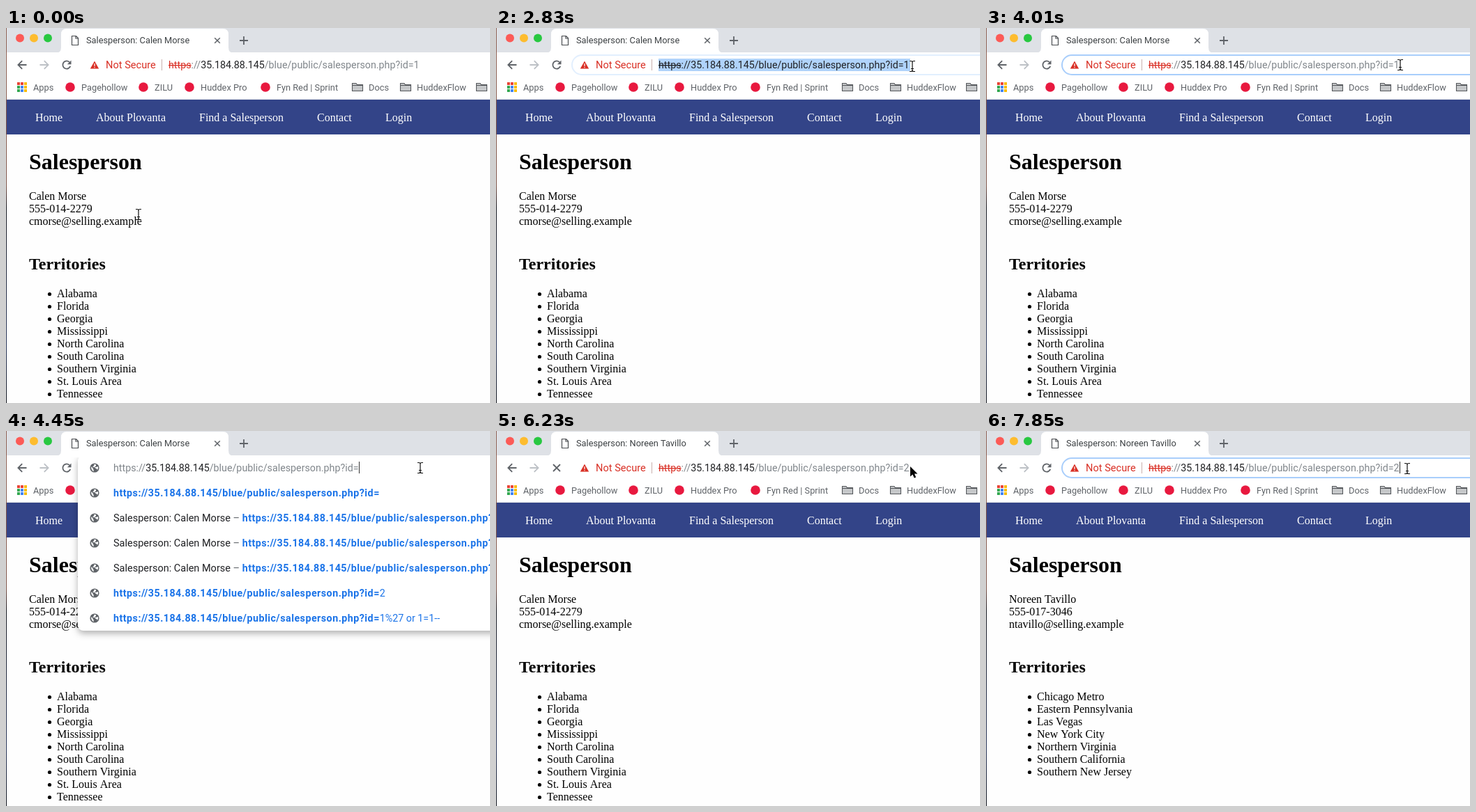
Recreate the animation shown at these times as an HTML page with a canvas. Size 694x539 px, loop 8 s.

```html
<!DOCTYPE html>
<html lang="en">
<head>
<meta charset="utf-8">
<title>Salesperson lookup</title>
<style>
html, body { margin: 0; width: 100%; height: 100%; overflow: hidden; background: #fefefe; }
canvas { display: block; }
</style>
</head>
<body>
<canvas id="stage" width="694" height="539"></canvas>
<script>
const ctx = document.getElementById('stage').getContext('2d');
const W = 694, H = 539, LOOP = 8000, TICK = LOOP / 54;

const SERIF = '"Liberation Serif", serif';
const SANS = 'Roboto, sans-serif';
const URL_FONT = `14.27px ${SANS}`;
const LABEL_FONT = `14.5px ${SANS}`;
const BOLD_FONT = `bold 14.27px ${SANS}`;
const SMALL_FONT = `12.8px ${SANS}`;
const INK = '#202124', GREY = '#5f6368', PALE = '#80868b', RED = '#d93025', BLUE = '#1a73e8';

const SCHEME = 'https', HOST = '35.184.88.145', PATH = '/blue/public/salesperson.php?id=';
const BASE = `${SCHEME}://${HOST}${PATH}`;

const PEOPLE = [
  {
    name: 'Calen Morse', phone: '555-014-2279', mail: 'cmorse@selling.example',
    areas: ['Alabama', 'Florida', 'Georgia', 'Mississippi', 'North Carolina',
      'South Carolina', 'Southern Virginia', 'St. Louis Area', 'Tennessee']
  },
  {
    name: 'Noreen Tavillo', phone: '555-017-3046', mail: 'ntavillo@selling.example',
    areas: ['Chicago Metro', 'Eastern Pennsylvania', 'Las Vegas', 'New York City',
      'Northern Virginia', 'Southern California', 'Southern New Jersey']
  }
];

// Pointer stops: tick, x, y, shape
const POINTER = [
  [0, 190, 268, beam], [1, 234, 245, arrow], [3, 290, 228, arrow], [4, 355, 203, arrow],
  [5, 402, 187, arrow], [7, 427, 167, arrow], [8, 470, 130, arrow], [9, 520, 88, arrow],
  [10, 562, 59, beam], [11, 571, 54, beam], [12, 582, 54, beam], [13, 591, 55, beam],
  [14, 597, 55, beam], [24, 594, 53, beam], [38, 594, 51, arrow], [46, 590, 53, beam],
  [47, 588, 53, beam], [50, 594, 53, beam], [51, 600, 54, beam], [52, 604, 54, beam],
  [53, 606, 54, beam]
];

function rect(x, y, w, h, color) {
  ctx.fillStyle = color;
  ctx.fillRect(x, y, w, h);
}

function pill(x, y, w, h, r, color) {
  ctx.fillStyle = color;
  ctx.beginPath();
  ctx.roundRect(x, y, w, h, r);
  ctx.fill();
}

function dot(x, y, r, color) {
  ctx.fillStyle = color;
  ctx.beginPath();
  ctx.arc(x, y, r, 0, 7);
  ctx.fill();
}

function path(d, color, width) {
  const shape = new Path2D(d);
  if (width) {
    ctx.strokeStyle = color;
    ctx.lineWidth = width;
    ctx.stroke(shape);
  } else {
    ctx.fillStyle = color;
    ctx.fill(shape);
  }
}

// Draws text and returns the x where it ends.
function text(str, x, y, font, color) {
  ctx.font = font;
  ctx.letterSpacing = font === BOLD_FONT ? '0.48px' : '0px';
  ctx.fillStyle = color;
  ctx.fillText(str, x, y);
  return x + ctx.measureText(str).width;
}

function at(x, y, draw) {
  ctx.save();
  ctx.translate(x, y);
  draw();
  ctx.restore();
}

function beam() {
  const d = 'M-4 -7.5H-2Q0 -7.5 0 -5.5Q0 -7.5 2 -7.5H4M0 -6V6M-4 7.5H-2Q0 7.5 0 5.5Q0 7.5 2 7.5H4M-2 3.5H2';
  path(d, 'rgba(255,255,255,.7)', 2.6);
  path(d, '#111', 1.2);
}

function arrow() {
  const d = 'M0 0V14.5L3.4 11.4L5.7 16.6L8.2 15.5L6 10.5H10.5Z';
  path(d, '#fff', 2);
  path(d, '#000');
}

function globe() {
  dot(0, 0, 6.6, GREY);
  path('M-5 -2L-2 1L-1 5Q-5 4 -5 -2ZM-1 -5H2V-3L0 -1L2 1L4 2L3 4Q6 1 4.8 -2L2 -1L-3 -1L-1 -3Z', '#fff');
}

function magnifier() {
  ctx.strokeStyle = GREY;
  ctx.lineWidth = 1.6;
  ctx.beginPath();
  ctx.arc(-1.5, -1.5, 3.8, 0, 7);
  ctx.stroke();
  path('M1.3 1.3L5.7 5.7', GREY, 1.8);
}

function folder() {
  path('M-7.5 5.5V-5.5H-2L-.5 -3.5H7.5V5.5Z', '#c6c8ca');
  path('M-7.5 5.5V-5.5H-2L-.5 -3.5H7.5V5.5ZM-7.5 -2.5H7.5', '#55585c', 1.1);
}

function reload() {
  ctx.strokeStyle = GREY;
  ctx.lineWidth = 1.8;
  ctx.beginPath();
  ctx.arc(0, 0, 5.6, .35, 5.5);
  ctx.stroke();
  path('M6.5 -6.5V-.8H.8Z', GREY);
}

function drawPage(person) {
  rect(0, 102, W, H, '#fefefe');
  rect(0, 103, W, 50, '#334488');
  const links = [['Home', 42], ['About Plovanta', 129], ['Find a Salesperson', 277], ['Contact', 446], ['Login', 544]];
  for (const [label, x] of links) text(label, x, 134, `16px ${SERIF}`, '#fff');

  text('Salesperson', 33, 203, `bold 32px ${SERIF}`, '#000');
  [person.name, person.phone, person.mail].forEach((line, i) =>
    text(line, 33, 247 + i * 18, `16px ${SERIF}`, '#000'));
  text('Territories', 33, 347, `bold 24px ${SERIF}`, '#000');
  person.areas.forEach((area, i) => {
    dot(62.5, 382.5 + i * 18, 2.6, '#000');
    text(area, 73, 387 + i * 18, `16px ${SERIF}`, '#000');
  });
}

function drawTabs(title) {
  rect(0, 0, W, 36, '#dee1e6');
  path('M71 36Q79 36 79 28V9Q79 1 87 1H311Q319 1 319 9V28Q319 36 327 36Z', '#fff');
  ['#fc5b57', '#fdbc2f', '#28c841'].forEach((c, i) => dot(20 + i * 20, 14.5, 6, c));
  path('M94.5 11.5H100.5L103.5 14.5V24.5H94.5ZM100 11.5V15H103.5', '#4b4e52', 1.2);
  text(`Salesperson: ${title}`, 115, 22, SMALL_FONT, '#3c4043');
  path('M299.2 14.2L306.8 21.8M306.8 14.2L299.2 21.8', GREY, 1.5);
  path('M335 18H347M341 12V24', GREY, 1.8);
}

function drawToolbar(docsHover, loading) {
  rect(0, 35, W, 67, '#fff');
  rect(0, 102, W, 1, '#e3e5e8');
  path('M29.5 53H18M23.2 47.2L17.4 53L23.2 58.8', GREY, 1.8);
  path('M48.5 53H60M54.8 47.2L60.6 53L54.8 58.8', '#bdc1c6', 1.8);
  at(87, 53, loading ? () => path('M-5 -5L5 5M5 -5L-5 5', GREY, 1.8) : reload);

  if (docsHover) pill(490, 71, 65, 28, 14, '#f1f3f4');
  const grid = ['#ea4335', '#ea4335', '#fbbc05', '#34a853', '#4285f4', '#fbbc05', '#34a853', '#4285f4', '#fbbc05'];
  grid.forEach((c, i) => rect(16 + i % 3 * 5, 78 + Math.floor(i / 3) * 5, 4, 4, c));
  text('Apps', 39, 89.5, SMALL_FONT, GREY);
  const marks = [['Pagehollow', 92, 108], ['ZILU', 197, 213], ['Huddex Pro', 263, 279], ['Fyn Red | Sprint', 372, 388]];
  for (const [label, icon, x] of marks) {
    dot(icon, 85, 6.8, '#e8193f');
    text(label, x, 89.5, SMALL_FONT, GREY);
  }
  for (const x of [504, 573, 682]) at(x, 85, folder);
  text('Docs', 520, 89.5, SMALL_FONT, GREY);
  text('HuddexFlow', 589, 89.5, SMALL_FONT, GREY);
}

function drawAddress(id, { ring, selected, caret, hover }) {
  if (ring) {
    ctx.globalAlpha = ring;
    ctx.strokeStyle = '#a9cefb';
    ctx.lineWidth = 2;
    ctx.beginPath();
    ctx.roundRect(109, 39, 640, 28, 14);
    ctx.stroke();
    ctx.globalAlpha = 1;
  }
  if (hover) rect(490, 44, 76, 18, '#f1f3f4');
  path('M127 47.5L133.2 58.5H120.8Z', RED);
  path('M127 51V55M127 56V57.3', '#fff', 1.2);
  text('Not Secure', 143, 58, `14.6px ${SANS}`, RED);
  rect(223, 45, 1, 16, '#c9b1ae');

  if (selected) rect(233, 44, 361, 18, '#b0d3fb');
  const pick = color => selected ? INK : color;
  let x = text(SCHEME, 233, 58, URL_FONT, pick(RED));
  rect(233, 53, x - 233, 1.3, pick(RED));
  x = text('://', x, 58, URL_FONT, pick(PALE));
  x = text(HOST, x, 58, URL_FONT, pick(INK));
  x = text(PATH + id, x, 58, URL_FONT, pick(PALE));
  if (caret) rect(Math.round(x), 44, 1, 17, '#333');
}

function drawPopup(typed, caret) {
  const rows = typed ? 2 : 6;
  ctx.save();
  ctx.shadowColor = 'rgba(0,0,0,.3)';
  ctx.shadowBlur = 10;
  ctx.shadowOffsetY = 4;
  ctx.beginPath();
  ctx.rect(0, 38, W, H);
  ctx.clip();
  pill(103, 35, 640, 36 + rows * 36, 8, '#fff');
  ctx.restore();

  at(127, 53, globe);
  let x = text(`${SCHEME}://`, 154, 58, URL_FONT, PALE);
  x = text(HOST, x, 58, URL_FONT, INK);
  x = text(PATH + typed, x, 58, URL_FONT, PALE);
  if (caret) rect(Math.round(x), 44, 1, 17, '#333');

  const titled = (name, y) => {
    const end = text(`Salesperson: ${name}`, 154, y, LABEL_FONT, INK);
    text(BASE, text(' – ', end, y, LABEL_FONT, GREY), y, BOLD_FONT, BLUE);
  };
  const suggest = (rest, y) => text(rest, text(BASE, 154, y, BOLD_FONT, BLUE), y, URL_FONT, BLUE);

  for (let i = 0; i < rows; i++) at(127, 89 + i * 36, typed && i === 1 ? magnifier : globe);
  if (typed) {
    titled(PEOPLE[1].name, 94);
    const end = text(BASE + typed, 154, 130, URL_FONT, INK);
    text(' – Fendra Search', end, 130, LABEL_FONT, GREY);
  } else {
    suggest('', 94);
    for (const y of [130, 166, 202]) titled(PEOPLE[0].name, y);
    suggest('2', 238);
    suggest('1%27 or 1=1--', 274);
  }
}

function drawEdge() {
  const g = ctx.createLinearGradient(0, 0, 0, H);
  g.addColorStop(0, '#8f6255');
  g.addColorStop(.42, '#7c5348');
  g.addColorStop(.48, '#15171f');
  g.addColorStop(.85, '#28365a');
  g.addColorStop(1, '#10131b');
  rect(0, 0, 1, H, g);
}

function ringLevel(tick) {
  if (tick >= 50) return Math.min(1, (tick - 49) / 3);
  return tick >= 19 && tick < 29 ? Math.min(1, (tick - 18) / 3) : 0;
}

function draw(time) {
  const tick = Math.floor(time / TICK);
  const within = (from, to) => tick >= from && tick < to;
  drawPage(PEOPLE[tick < 43 ? 0 : 1]);
  drawTabs(PEOPLE[tick < 42 ? 0 : 1].name);
  drawToolbar(within(9, 13), within(41, 44));

  if (within(29, 41)) {
    drawPopup(tick < 38 ? '' : '2', !within(32, 36));
  } else {
    drawAddress(tick < 29 ? '1' : '2', {
      ring: ringLevel(tick),
      selected: within(19, 23),
      caret: within(23, 27) || tick >= 50,
      hover: within(11, 14)
    });
  }
  drawEdge();

  const [, x, y, shape] = POINTER.findLast(stop => stop[0] <= tick);
  at(x, y, shape);
}

function frame() {
  draw(performance.now() % LOOP);
  requestAnimationFrame(frame);
}
frame();
</script>
</body>
</html>
```
